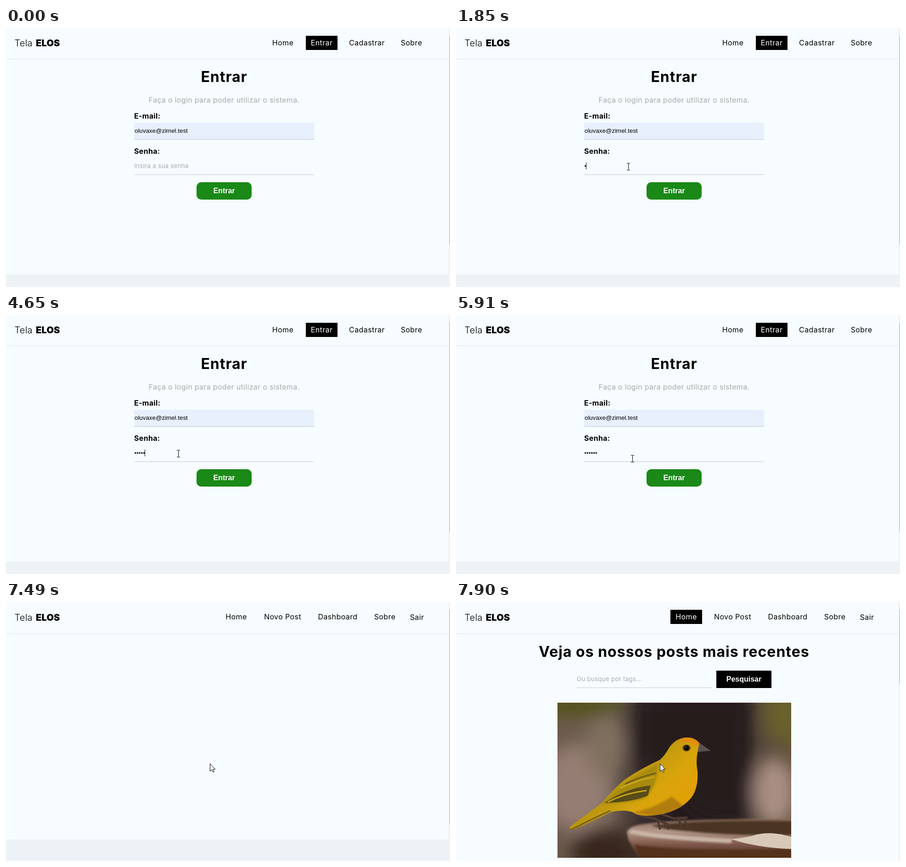
An HTML page for the animation above (8000 ms loop, 967 by 566 pixels).

```html
<!DOCTYPE html>
<html lang="pt">
<head>
<meta charset="utf-8">
<title>Entrar</title>
<style>
html, body { margin: 0; width: 100%; height: 100%; overflow: hidden; background: #f6fcff; }
svg { display: block; width: 100vw; height: 100vh; }
text { font: 400 16px Inter, sans-serif; letter-spacing: .02em; }
.mid { text-anchor: middle; }
.nav { letter-spacing: .025em; text-anchor: middle; }
.logo { font-size: 20px; font-weight: 300; letter-spacing: .01em; }
.black { font-weight: 900; }
.title { font-size: 32px; font-weight: 700; letter-spacing: .031em; text-anchor: middle; }
.label { font-weight: 700; }
.hint { font-size: 13.33px; fill: #aaa; }
.typed { font: 13.33px "Liberation Sans", Arial, sans-serif; letter-spacing: 0; }
.btn { font: 700 16px "Liberation Sans", Arial, sans-serif; letter-spacing: 0; fill: #fff; text-anchor: middle; }
.line { fill: #c3c7ca; }
</style>
</head>
<body>
<svg viewBox="0 0 967 566">
  <defs>
    <linearGradient id="shade" x2="0" y2="1">
      <stop stop-opacity=".045"/><stop offset="1" stop-opacity="0"/>
    </linearGradient>
    <linearGradient id="wall">
      <stop stop-color="#6b5a4c"/><stop offset=".22" stop-color="#6e5f52"/><stop offset=".36" stop-color="#3a2e2e"/>
      <stop offset=".5" stop-color="#251b1e"/><stop offset=".76" stop-color="#281d1f"/>
      <stop offset=".86" stop-color="#55463b"/><stop offset="1" stop-color="#5f503a"/>
    </linearGradient>
    <linearGradient id="feather" gradientUnits="userSpaceOnUse" x1="400" y1="355" x2="490" y2="450">
      <stop stop-color="#b9960f"/><stop offset=".5" stop-color="#d9a40c"/><stop offset="1" stop-color="#e2a006"/>
    </linearGradient>
    <linearGradient id="clay" x2="0" y2="1">
      <stop stop-color="#8a6a58"/><stop offset=".3" stop-color="#b59a8a"/>
      <stop offset=".6" stop-color="#80594a"/><stop offset="1" stop-color="#3f2018"/>
    </linearGradient>
    <filter id="soft" x="-60%" y="-60%" width="220%" height="220%"><feGaussianBlur stdDeviation="18"/></filter>
    <filter id="smooth"><feGaussianBlur stdDeviation="2"/></filter>
    <clipPath id="frame"><path d="M221 220h509v339h-509z"/></clipPath>
    <clipPath id="body"><use href="#bird"/></clipPath>
  </defs>

  <rect width="967" height="566" fill="#f6fcff"/>
  <rect id="footer" width="967" height="60" fill="#edf2f6"/>
  <rect id="shadow" width="964" height="5" fill="url(#shade)"/>
  <g id="logo">
    <text class="logo" x="18.500" y="40">Tela</text>
    <text class="logo black" x="65" y="40">ELOS</text>
  </g>

  <g id="login">
    <rect x="653" y="17" width="69" height="31"/>
    <text class="nav" x="603" y="38">Home</text>
    <text class="nav" x="687.5" y="38" fill="#fff">Entrar</text>
    <text class="nav" x="786" y="38">Cadastrar</text>
    <text class="nav" x="883" y="38">Sobre</text>
    <text class="title" x="475" y="118">Entrar</text>
    <text class="mid" x="475" y="163" fill="#aaa">Faça o login para poder utilizar o sistema.</text>
    <text class="label" x="279" y="198">E-mail:</text>
    <rect x="279" y="207" width="392" height="36" fill="#e8f0fe"/>
    <rect class="line" x="279" y="243" width="392" height="1"/>
    <text class="typed" x="280" y="229">oluvaxe@zimel.test</text>
    <text class="label" x="279" y="275">Senha:</text>
    <text class="hint" id="hint" x="279.5" y="306">Insira a sua senha</text>
    <g id="dots"></g>
    <rect id="caret" y="294" width="1" height="15"/>
    <rect class="line" x="279" y="320" width="392" height="1"/>
    <rect id="button" x="415" y="337" width="120" height="38" rx="10"/>
    <text class="btn" id="action" x="475" y="361"></text>
  </g>

  <g id="home">
    <rect id="tab" x="467" y="17" width="69" height="31"/>
    <text class="nav" id="tabText" x="501.500" y="38">Home</text>
    <text class="nav" x="602.5" y="38">Novo Post</text>
    <text class="nav" x="722.5" y="38">Dashboard</text>
    <text class="nav" x="825" y="38">Sobre</text>
    <text class="nav" x="895" y="39">Sair</text>
    <g id="posts">
      <text class="title" x="475" y="120">Veja os nossos posts mais recentes</text>
      <text class="hint" x="263" y="173">Ou busque por tags...</text>
      <rect class="line" x="263" y="187" width="294" height="1"/>
      <rect x="567" y="150" width="120" height="38"/>
      <text class="btn" x="627" y="174">Pesquisar</text>
      <g clip-path="url(#frame)">
        <rect x="221" y="220" width="509" height="339" fill="url(#wall)"/>
        <g filter="url(#soft)">
          <ellipse cx="265" cy="220" rx="100" ry="32" fill="#55521a"/>
          <ellipse cx="262" cy="405" rx="75" ry="95" fill="#947d72"/>
          <ellipse cx="325" cy="315" rx="40" ry="65" fill="#80705f"/>
          <ellipse cx="325" cy="550" rx="75" ry="55" fill="#38261f"/>
          <ellipse cx="715" cy="245" rx="42" ry="65" fill="#69622a"/>
          <ellipse cx="693" cy="415" rx="45" ry="75" fill="#a98f84"/>
          <path d="M395 210H640V470H540L395 350Z" fill="#251b1e"/>
        </g>
        <g filter="url(#smooth)">
          <path d="M372 503Q376 488 420 484Q500 473 740 474V565H400Q388 540 376 521Z" fill="url(#clay)"/>
          <path d="M425 488Q520 475 740 478V510Q600 512 510 502Q440 497 425 488Z" fill="#4b3520"/>
          <path d="M388 530Q500 546 740 538V565H402Z" fill="#55301f"/>
          <path d="M380 501Q430 514 600 522" fill="none" stroke="#cbb6a8" stroke-width="9"/>
        </g>
        <path d="M598 518Q630 515 645 511Q685 498 735 515V540Q660 538 598 518Z" fill="#d8c8b8"/>
        <path d="M398 466l36 8 30 13m-24 -9l4 17m8 -15l10 15m-18 -33l30 11 28 -2m-18 2l8 20m4 -20l8 18" fill="none" stroke="#4d3b31" stroke-width="5" stroke-linecap="round"/>
        <path d="M530 308L555 325 523 328Z" fill="#5a5250"/>
        <path id="bird" d="M530 308Q520 296 503 296Q480 297 465 317Q456 334 444 345Q395 368 365 390Q340 412 318 439Q280 467 247 492L252 499Q300 478 337 459Q365 453 384 459Q402 472 446 464Q491 455 513 427Q528 406 526 370Q522 351 526 328Z" fill="url(#feather)"/>
        <g clip-path="url(#body)">
          <g filter="url(#smooth)">
            <path d="M478 304Q510 286 532 308L524 314Q505 302 478 304Z" fill="#e58a08"/>
            <path d="M384 460Q430 452 470 425L500 450 446 470Z" fill="#b17d10"/>
            <path d="M440 352Q398 374 364 400Q338 421 320 441Q370 441 412 429Q440 402 440 352Z" fill="#a88b10"/>
          </g>
          <path d="M424 401Q375 405 323 439Q382 438 418 423Z" fill="#584b18"/>
          <path d="M415 412Q367 418 331 437M433 382Q390 390 358 407" fill="none" stroke="#c9a51c" stroke-width="3"/>
          <path d="M250 498Q290 477 336 456M436 374Q395 384 368 398" fill="none" stroke="#6f5c12" stroke-width="3"/>
        </g>
        <ellipse cx="502" cy="319" rx="9" ry="7.500" fill="#6e4f06"/>
        <circle cx="502" cy="319" r="6" fill="#0e0b08"/>
        <circle cx="500" cy="317" r="1" fill="#aaa"/>
      </g>
    </g>
  </g>

  <rect x="964" width="3" height="566" fill="#f2f1f4"/>
  <rect id="thumb" x="966" y="16" width="1" fill="#b3abad"/>

  <g id="pointer">
    <path id="arrow" d="M.5.5V17L4.300 13.500 6.800 19 9.200 18 6.800 12.500H11.700Z" fill="#fff" stroke="#000"/>
    <path id="beam" d="M-3-7.500H-1L.5-7 2-7.500H4M.5-7V7M-3 7.500H-1L.5 7 2 7.500H4" fill="none" stroke="#000"/>
    <path id="hand" d="M-1.500.5Q0-1 1.500.5V7q1.600-1 3 .6 1.600-.8 3 .8 2-.3 2.300 1.400V15l-2 4v3.300H-2.500V20L-6 13.500q0-2.700 2.200-1.800L-1.500 14Z" fill="#fff" stroke="#000"/>
  </g>
</svg>
<script>
const LOOP = 8000;
const $ = id => document.getElementById(id);
const show = (id, on) => { $(id).style.display = on ? '' : 'none'; };
const set = (id, name, value) => $(id).setAttribute(name, value);

// Value of the last [time, value] step reached.
const at = (steps, t) => steps.reduce((last, step) => step[0] <= t ? step : last)[1];
const spread = (from, to, values) =>
  values.map((v, i) => [Math.round(from + (to - from) * i / (values.length - 1)), v]);

const typed = [[0, 0], [1850, 1], [2580, 0], [3190, 1], [3720, 2], [4050, 3], [4320, 4], [4650, 5], [5110, 6]];
const caret = [[0, 0], [1190, 1], [1720, 0], [1850, 1], [2450, 0], [2580, 1], [2990, 0], [3190, 1], [5640, 0], [6120, 1], [6670, 0]];
const pointer = [
  [0, null],
  ...spread(70, 730, [
    ['arrow', 876, 556], ['arrow', 800, 500], ['arrow', 715, 440], ['arrow', 630, 390], ['arrow', 550, 350],
    ['beam', 480, 318], ['beam', 425, 298], ['beam', 392, 288], ['beam', 383, 291], ['beam', 381, 298]]),
  ...spread(1130, 1260, [['beam', 378, 304], ['beam', 375, 306], ['beam', 375, 303]]),
  ...spread(5840, 6400, [
    ['beam', 377, 306], ['beam', 384, 314], ['arrow', 395, 326], ['arrow', 408, 339], ['hand', 422, 349],
    ['hand', 434, 356], ['hand', 441, 358], ['hand', 445, 356], ['hand', 446, 354]]),
  [7420, ['arrow', 444, 353]]
];
const hover = [[0, 0], ...spread(6120, 6400, [.2, .5, .8, .95, 1])];
const tabFade = [[0, 0], ...spread(7560, 7900, [.08, .44, .69, .86, .96, 1])];

for (let i = 0; i < 6; i++) {
  $('dots').insertAdjacentHTML('beforeend', `<circle cx="${281.8 + 4.7 * i}" cy="301.5" r="1.7"/>`);
}

function draw(t) {
  const logged = t >= 7420, loaded = t >= 7560;
  const top = logged ? 68 : 66;
  show('login', !logged);
  show('home', logged);
  show('posts', loaded);
  show('footer', !loaded);
  set('footer', 'y', logged ? 519 : 539);
  set('shadow', 'y', top);
  set('logo', 'transform', `translate(0 ${logged ? 1 : 0})`);
  set('thumb', 'height', loaded ? 164 : logged ? 470 : 458);

  const count = at(typed, t);
  show('hint', !count);
  [...$('dots').children].forEach((dot, i) => { dot.style.display = i < count ? '' : 'none'; });
  show('caret', at(caret, t));
  set('caret', 'x', Math.floor(279 + 4.7 * count));

  const h = at(hover, t);
  set('button', 'fill', `rgb(${26 - 11 * h},${137 - 22 * h},${24 - 11 * h})`);
  $('action').textContent = t < 6810 ? 'Entrar' : 'Aguarde...';

  const fade = at(tabFade, t), grey = Math.round(255 * fade);
  set('tab', 'opacity', fade);
  set('tabText', 'fill', `rgb(${grey},${grey},${grey})`);

  const [kind, x, y] = at(pointer, t) || [];
  for (const id of ['arrow', 'beam', 'hand']) show(id, id === kind);
  if (kind) set('pointer', 'transform', `translate(${x} ${y})`);
}

const start = performance.now();
function tick() {
  draw((performance.now() - start) % LOOP);
  requestAnimationFrame(tick);
}
tick();
</script>
</body>
</html>
```
